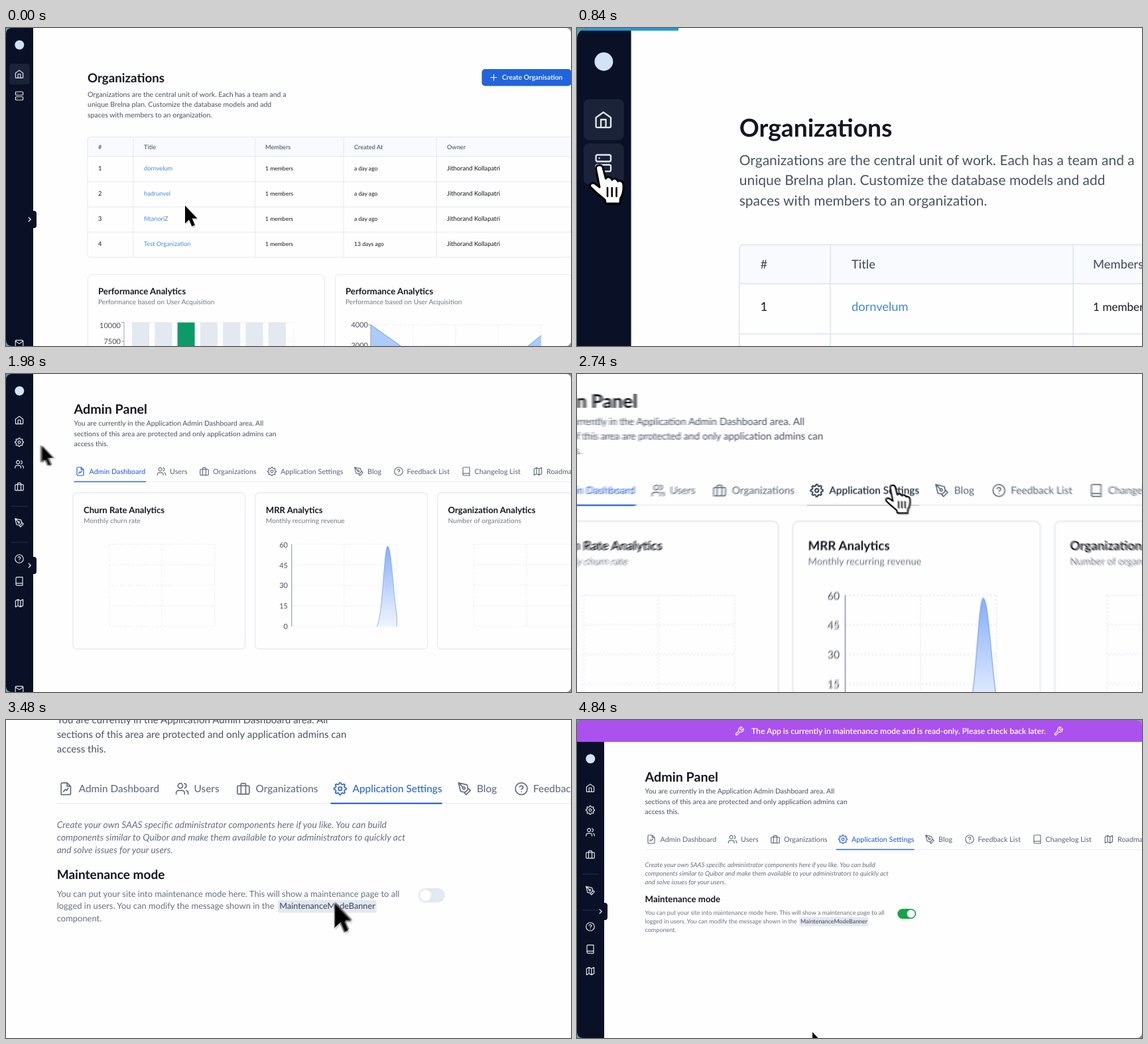
Write an HTML page that moves like this. It is 852 px wide and 480 px high and loops after 4.86 s.

```html
<!DOCTYPE html>
<html lang="en">
<head>
<meta charset="utf-8">
<title>Admin walkthrough</title>
<style>
html, body { margin: 0; width: 100%; height: 100%; overflow: hidden; background: #6fa5b0; }
svg { display: block; width: 852px; height: 480px; }
text { font-family: Lato, "Open Sans", sans-serif; text-rendering: geometricPrecision; white-space: pre; }
</style>
</head>
<body>
<svg id="stage" viewBox="0 0 852 480" xmlns="http://www.w3.org/2000/svg"></svg>
<script>
const LOOP = 4860, BANNER_H = 33;
const LOAD_AT = 1960, SETTINGS_AT = 2900, BANNER_AT = 4200;
const INK = '#14171f', SOFT = '#4a5261', MUTED = '#727a88', LINE = '#e4e8f1', AXIS = '#98a2b5';
const BLUE = '#2f66d8', DARK = '#0a1126', PAPER = '#fefeff', ACTIVE = '#1a2338', FILL = '#e3e8f1';
const stage = document.getElementById('stage');

/* ---- drawing helpers ---- */
const text = (x, y, size, str, fill = INK, weight = 400, more = '') =>
  `<text x="${x}" y="${y}" font-size="${size}" fill="${fill}" font-weight="${weight}" ${more}>${str}</text>`;
const rect = (x, y, w, h, fill, rx = 0, more = '') =>
  `<rect x="${x}" y="${y}" width="${w}" height="${h}" rx="${rx}" fill="${fill}" ${more}/>`;
const path = (d, stroke = LINE, width = 1, more = '') =>
  `<path d="${d}" fill="none" stroke="${stroke}" stroke-width="${width}" ${more}/>`;
const lines = (x, y, step, size, rows, fill, more) =>
  rows.map((r, i) => text(x, y + i * step, size, r, fill, 400, more)).join('');

function gearPath() {
  let d = '';
  for (let i = 0; i < 32; i++) {
    const a = (i - 0.5) * Math.PI / 16, r = i % 4 < 2 ? 10.3 : 7.8;
    d += (i ? 'L' : 'M') + (12 + r * Math.sin(a)).toFixed(1) + ' ' + (12 - r * Math.cos(a)).toFixed(1);
  }
  return d + 'zM12 9a3 3 0 1 0 0 6 3 3 0 0 0 0-6z';
}

const ICONS = {
  home: 'M3 9.5 12 3l9 6.5V20a1.5 1.5 0 0 1-1.5 1.5h-15A1.5 1.5 0 0 1 3 20zM9 21.5V12h6v9.5',
  server: 'M5 2h14a2 2 0 0 1 2 2v4a2 2 0 0 1-2 2H5a2 2 0 0 1-2-2V4a2 2 0 0 1 2-2zM5 14h14a2 2 0 0 1 2 2v4a2 2 0 0 1-2 2H5a2 2 0 0 1-2-2v-4a2 2 0 0 1 2-2zM7 6h.01M7 18h.01',
  gear: gearPath(),
  users: 'M16 21v-2a4 4 0 0 0-4-4H6a4 4 0 0 0-4 4v2M9 3a4 4 0 1 0 0 8 4 4 0 0 0 0-8zM22 21v-2a4 4 0 0 0-3-3.87M16 3.13a4 4 0 0 1 0 7.75',
  bag: 'M4 7h16a2 2 0 0 1 2 2v10a2 2 0 0 1-2 2H4a2 2 0 0 1-2-2V9a2 2 0 0 1 2-2zM16 21V5a2 2 0 0 0-2-2h-4a2 2 0 0 0-2 2v16',
  pen: 'M12 19l7-7 3 3-7 7zM18 13l-1.5-7.5L2 2l3.5 14.5L13 18zM2 2l7.6 7.6M11 9a2 2 0 1 0 0 4 2 2 0 0 0 0-4z',
  help: 'M12 2a10 10 0 1 0 0 20 10 10 0 0 0 0-20zM9.1 9a3 3 0 0 1 5.8 1c0 2-3 3-3 3M12 17h.01',
  book: 'M4 19.5v-15A2.5 2.5 0 0 1 6.5 2H20v20H6.5a2.5 2.5 0 0 1 0-5H20',
  map: 'M3 6l6-3 6 3 6-3v15l-6 3-6-3-6 3zM9 3v15M15 6v15',
  file: 'M14 2H6a2 2 0 0 0-2 2v16a2 2 0 0 0 2 2h12a2 2 0 0 0 2-2V8zM14 2v6h6M8 17l3-4 2 2 3-4',
  wrench: 'M14.7 6.3a1 1 0 0 0 0 1.4l1.6 1.6a1 1 0 0 0 1.4 0l3.77-3.77a6 6 0 0 1-7.94 7.94l-6.91 6.91a2.12 2.12 0 0 1-3-3l6.91-6.91a6 6 0 0 1 7.94-7.94l-3.76 3.76z',
  mail: 'M4 4h16a2 2 0 0 1 2 2v12a2 2 0 0 1-2 2H4a2 2 0 0 1-2-2V6a2 2 0 0 1 2-2zM22 6l-10 7L2 6'
};
const icon = (name, x, y, color, size = 15) =>
  `<path d="${ICONS[name]}" transform="translate(${x - size / 2} ${y - size / 2}) scale(${size / 24})"
    fill="none" stroke="${color}" stroke-width="1.9" stroke-linecap="round" stroke-linejoin="round"/>`;

/* ---- organizations page ---- */
function orgTable() {
  const cols = [139, 208, 391, 525, 665], sizes = [9.3, 9.2, 8.6, 8.6, 9.4];
  const names = ['dornvelum', 'hadrunvel', 'filtanoriZ', 'Test Organization'];
  let s = rect(123, 164.5, 740, 30, '#f8fafd', 3);
  s += path('M870 164.5H126.5a3.5 3.5 0 0 0-3.5 3.5V342.5a3.5 3.5 0 0 0 3.5 3.5H870');
  s += path('M123 194H870M123 232H870M123 270H870M123 308H870M192 164.5V346M376 164.5V346M509 164.5V346M649 164.5V346');
  ['#', 'Title', 'Members', 'Created At', 'Owner'].forEach((h, i) => s += text(cols[i], 182.5, 9.2, h, SOFT, 500));
  names.forEach((n, i) => {
    const cells = [i + 1, n, '1 members', i < 3 ? 'a day ago' : '13 days ago', 'Jithorand Kollapatri'];
    cells.forEach((c, j) => s += text(cols[j], 214.8 + 37.9 * i, sizes[j], c, j === 1 ? '#4088e0' : INK));
  });
  return s;
}

function orgCharts() {
  let s = '';
  for (const x of [123.5, 496.5]) {
    s += rect(x, 372, 356.5, 180, PAPER, 6, `stroke="${LINE}"`);
    s += text(x + 15.5, 401.5, 13.2, 'Performance Analytics', INK, 700);
    s += text(x + 15.5, 417, 10.2, 'Performance based on User Acquisition', MUTED);
  }
  const end = 'text-anchor="end"', dash = 'stroke-dasharray="2 2"';
  s += text(173, 453, 11, '10000', SOFT, 400, end) + text(173, 477, 11, '7500', SOFT, 400, end);
  s += path('M178 444.5H434V480M178 473H434', LINE, 1, dash) + path('M174 444.5h4V480M174 473h4', AXIS);
  for (let i = 0; i < 7; i++) s += rect(190 + 34.3 * i, 444.5, 26, 40, i === 2 ? '#0c9a68' : FILL);
  s += text(546, 452, 11, '4000', SOFT, 400, end) + text(546, 483, 11, '3000', SOFT, 400, end);
  s += path('M550 448H807M550 479H807M614 448V480M678 448V480M742 448V480M807 448V480', LINE, 1, dash);
  s += '<path d="M550 448L598 482H785L807 464V490H550z" fill="#adcbf8"/>';
  s += path('M550 448L598 482M785 482L807 464', '#5f9bec') + path('M546 448h4V480', AXIS);
  return s;
}

const orgPage = () =>
  text(123, 82.2, 18.7, 'Organizations', INK, 700) +
  lines(123, 104, 15.35, 10.55, [
    'Organizations are the central unit of work. Each has a team and a',
    'unique Brelna plan. Customize the database models and add',
    'spaces with members to an organization.'], SOFT) +
  rect(717.5, 62, 135, 25.5, '#2264dc', 5) +
  path('M730.5 74.7h10M735.5 69.7v10', '#fff', 1.1) +
  text(748, 78.3, 10.3, 'Create Organisation', '#fff', 600) +
  orgTable() + orgCharts();

/* ---- admin pages ---- */
const TABS = [
  ['file', 112, 125.5, 'Admin Dashboard'], ['users', 234.5, 247, 'Users'],
  ['bag', 299, 312, 'Organizations'], ['gear', 401, 414, 'Application Settings'],
  ['pen', 532, 545, 'Blog'], ['help', 592, 604.5, 'Feedback List'],
  ['book', 694, 706.5, 'Changelog List'], ['map', 802, 815, 'Roadmap']];
const tab = (i, color) => {
  const [ic, ix, tx, label] = TABS[i];
  return icon(ic, ix, 147, color) + text(tx, 150.6, 10.75, label, color, 500);
};
const tabs = active =>
  path('M102.5 162.5H870', '#e9edf4') + TABS.map((_, i) => tab(i, i === active ? BLUE : '#666f7f')).join('');

const adminHead = () =>
  text(102.5, 60.4, 19.7, 'Admin Panel', INK, 700) +
  lines(102.5, 78.2, 15.4, 10.5, [
    'You are currently in the Application Admin Dashboard area. All',
    'sections of this area are protected and only application admins can',
    'access this.'], SOFT);

function dashboard() {
  let s = tabs(0) + path('M102.5 162.5H211', BLUE, 1.6);
  s += `<g id="tabHover">${path('M390.5 162.5H508.5', '#c3cad8', 1.2)}${tab(3, '#313847')}</g>`;
  const cards = [['Churn Rate Analytics', 'Monthly churn rate'],
    ['MRR Analytics', 'Monthly recurring revenue'],
    ['Organization Analytics', 'Number of organizations']];
  cards.forEach(([title, sub], i) => {
    const x = 101 + 274.8 * i, ax = x + 55;
    s += rect(x, 179.2, 259.6, 236, PAPER, 6, `stroke="${LINE}" stroke-width="1.2"`);
    s += text(x + 16, 209.6, 13.1, title, INK, 700) + text(x + 16, 225, 10.2, sub, MUTED);
    let grid = `M${ax} 257V381M${ax + 79} 257V381M${ax + 158.7} 257V381`;
    for (let j = 0; j < 5; j++) grid += `M${ax} ${257 + 31 * j}h158.7`;
    s += path(grid, LINE, 0.9, 'stroke-dasharray="2 2"');
  });
  for (let j = 0; j < 5; j++) s += text(425, 261.6 + 30.9 * j, 11, 60 - 15 * j, SOFT, 400, 'text-anchor="end"');
  s += path('M430.8 257V381', AXIS, 1.2);
  const spike = 'M559 381C568 372 570 260 575.5 260S584 330 589.4 366V381';
  return s + `<path d="${spike}z" fill="url(#spike)"/>` + path(spike, '#78a4ee', 0.8);
}

const settings = () =>
  tabs(3) + path('M391 162.5H508.5', BLUE, 1.5) +
  lines(102.5, 188.7, 13.1, 9.7, [
    'Create your own SAAS specific administrator components here if you like. You can build',
    'components similar to Quibor and make them available to your administrators to quickly act',
    'and solve issues for your users.'], '#687080', 'font-style="italic"') +
  text(102.5, 242.2, 13.3, 'Maintenance mode', INK, 700) +
  rect(335.4, 264.5, 104, 13.4, FILL, 2) +
  lines(102.5, 260.8, 13.1, 9.05, [
    'You can put your site into maintenance mode here. This will show a maintenance page to all',
    'logged in users. You can modify the message shown in the',
    'component.'], '#687080') +
  text(337, 273.9, 8.9, 'MaintenanceModeBanner', '#384152') +
  `<rect id="track" x="483.3" y="252" width="28" height="15" rx="7.5"/><circle id="knob" cy="259.5" r="6" fill="#fff"/>`;

/* ---- shared chrome ---- */
const SIDE = '#e3e8f0';
const sideItems = list => list.map(([n, y]) => icon(n, 20, y, SIDE)).join('');
const adminSide = () =>
  sideItems([['home', 69.5], ['gear', 103], ['users', 136.3], ['bag', 170], ['pen', 224.5], ['help', 279], ['book', 312.8], ['map', 346]]) +
  path('M8 199.7H33M8 254H33', '#263048');

const ARROW = 'M0 0V27L6 21.5L10.3 31.5L15 29.5L10.7 19.5H18.5Z';
const HAND = 'M-2 2.5C-2-1 3-1 3.4 2L5.5 10C6 8.3 9.5 8.3 10.2 11C11 9.4 14 9.6 14.6 12C16 11 18.6 12 18.8 14.5C19.2 19 18 23 16.6 25L16.3 29H5.5L4.8 26C1 23-3 19.5-6 16.5C-7.5 14.5-5 12.5-2.8 13.8L.8 16.5Z';
const shadow = d => `<path d="${d}" transform="translate(1 1.9)" opacity=".22"/>`;

stage.innerHTML = `
<defs>
  <linearGradient id="spike" x1="0" y1="0" x2="0" y2="1">
    <stop offset="0" stop-color="#86aefa"/><stop offset=".8" stop-color="#dde8fe"/><stop offset="1" stop-color="#eef4ff"/>
  </linearGradient>
  <linearGradient id="desk"><stop stop-color="#4da3ae"/><stop offset="1" stop-color="#8b9690"/></linearGradient>
  <clipPath id="win"><rect width="852" height="480" rx="8"/></clipPath>
  <g id="arrow">${shadow(ARROW)}
    <path d="${ARROW}" stroke="#fff" stroke-width="1.7" stroke-linejoin="round" paint-order="stroke"/>
  </g>
  <g id="hand" stroke-linejoin="round" stroke-linecap="round">${shadow(HAND)}
    <path d="${HAND}" fill="#fff" stroke="#000" stroke-width="1.5"/>
    <path d="M6.8 17v6.5M10.2 17v6.5M13.6 17v6.5" stroke="#000" stroke-width="1.3"/>
  </g>
  <g id="page"><g clip-path="url(#win)">
    ${rect(0, 0, 852, 480, PAPER)}
    ${rect(0, 0, 41, 480, DARK)}
    <g id="shift">
      <circle cx="20.3" cy="25.5" r="7" fill="#d3e2f6"/>
      <rect id="sideHover" x="5" y="87.5" width="30.5" height="31" rx="4" fill="${ACTIVE}"/>
      <g id="org">${rect(5, 54, 30.5, 31, ACTIVE, 4)}${sideItems([['home', 69.5], ['server', 102.5]])}${orgPage()}</g>
      <g id="admin">${adminSide()}${adminHead()}<g id="dash">${dashboard()}</g><g id="set">${settings()}</g></g>
      ${icon('mail', 20, 476, SIDE, 14)}
    </g>
    <path d="M40 276h2a4 4 0 0 1 4 4v18a4 4 0 0 1-4 4h-2z" fill="${DARK}"/>
    ${path('M33.8 285.6l3.4 3.4-3.4 3.4', '#eef1f6', 1.3)}
    <g id="banner">${rect(0, 0, 852, BANNER_H, '#ab52ee')}
      ${icon('wrench', 245, 17, '#fff')}${icon('wrench', 726, 17, '#fff')}
      ${text(485, 20.8, 12.1, 'The App is currently in maintenance mode and is read-only. Please check back later.', '#fff', 600, 'text-anchor="middle"')}
    </g>
    <rect id="bar" height="2" fill="#2299dd"/>
  </g></g>
</defs>
<rect width="852" height="480" fill="url(#desk)"/>
<g id="layers"></g>`;

const el = id => document.getElementById(id);

// Stacked copies at nearby times average into motion blur.
const SAMPLES = [0, -6, 6, -3, 3];
el('layers').innerHTML = SAMPLES.map((_, i) =>
  `<g opacity="${1 / (i + 1)}"><use href="#page"/><use href="#arrow"/></g>`).join('');
const layers = [...el('layers').children];

/* ---- motion ---- */
const clamp = v => Math.max(0, Math.min(1, v));
const ease = p => (1 - Math.cos(Math.PI * clamp(p))) / 2;
const mix = (a, b, p) => a + (b - a) * p;

function track(keys, t) {
  let i = 0;
  while (i < keys.length - 2 && t >= keys[i + 1][0]) i++;
  const a = keys[i], b = keys[i + 1], p = ease((t - a[0]) / (b[0] - a[0]));
  return a.slice(1).map((v, j) => mix(v, b[j + 1], p));
}

// time, scale, x, y
const CAMERA = [
  [60, 1, 0, 0], [840, 1.99, 0, 0], [1180, 1.99, 0, 0], [1876, 1, 0, 0],
  [2367, 1, 0, 0], [2900, 1.55, -270, -44.6], [3000, 1.55, -270, -44.6],
  [3460, 1.431, -70, -106.6], [4100, 1.402, -50.5, -107], [4780, 1, 0, 0]];
// time, x, y
const POINTER = [
  [60, 270, 268], [620, 16.3, 104.2], [1800, 16.3, 104.2], [2800, 484, 142],
  [2950, 484, 142], [3620, 385, 281], [4040, 504, 253], [4240, 504, 253], [4830, 355, 471]];

function isHand(x, y, t) {
  if (x < 36 && y < 120) return true;
  if (t > LOAD_AT && t < BANNER_AT && x > 102 && y > 134 && y < 163) return true;
  return t > SETTINGS_AT && x > 483 && x < 512 && y > 248 && y < 268;
}

const show = (id, on) => el(id).setAttribute('display', on ? 'inline' : 'none');

function draw(t) {
  const admin = t >= LOAD_AT, set = t >= SETTINGS_AT, maint = t >= BANNER_AT;
  const [px, py] = track(POINTER, t), hand = isHand(px, py, t);
  show('org', !admin);
  show('admin', admin);
  show('dash', !set);
  show('set', set);
  show('banner', maint);
  show('sideHover', hand && px < 36);
  show('tabHover', hand && px > 390 && px < 509);
  el('shift').setAttribute('transform', `translate(0 ${maint ? BANNER_H : 0})`);

  const loading = t >= 720 && t < LOAD_AT;
  el('bar').setAttribute('width', loading ? mix(71, 110, (t - 720) / 800) : 0);

  const on = ease((t - 4130) / 140), over = hand && set && py > 240;
  el('knob').setAttribute('cx', mix(491, 503.6, on));
  el('track').setAttribute('fill', on > 0.4 ? '#16a34a' : over ? '#f8fafd' : FILL);
  el('track').setAttribute('stroke', over && on <= 0.4 ? FILL : 'none');

  const at = SAMPLES.map(d => {
    const u = Math.max(0, Math.min(LOOP - 1, t + d));
    return [...track(CAMERA, u), ...track(POINTER, u)];
  });
  const moving = at[1].some((v, i) => Math.abs(v - at[2][i]) > (i ? 0.3 : 0.0008));
  layers.forEach((g, i) => {
    g.setAttribute('display', i && !moving ? 'none' : 'inline');
    const [s, x, y, cx, cy] = at[i], cam = `translate(${x} ${y}) scale(${s})`;
    g.children[0].setAttribute('transform', cam);
    g.children[1].setAttribute('transform', `${cam} translate(${cx} ${cy})`);
    g.children[1].setAttribute('href', hand ? '#hand' : '#arrow');
  });
}

function tick() {
  draw(performance.now() % LOOP);
  requestAnimationFrame(tick);
}
tick();
</script>
</body>
</html>
```
